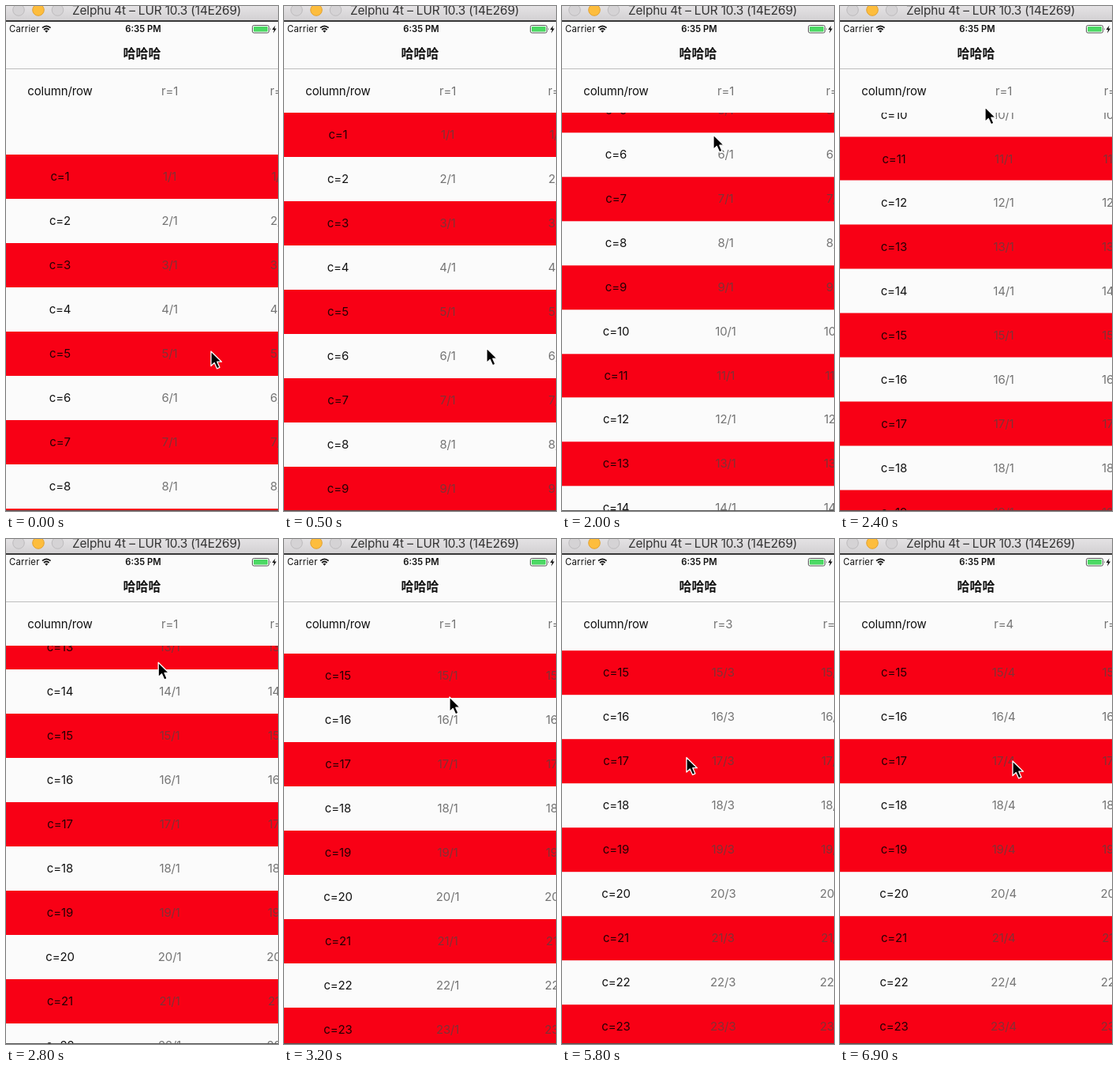
Write an HTML page that moves like this. It is 345x639 px and loops after 7 s.

```html
<!DOCTYPE html>
<html lang="zh">
<head>
<meta charset="utf-8">
<style>
  html, body { margin: 0; width: 100%; height: 100%; overflow: hidden; }
  body { position: relative; background: #fbfbfb; font: 15px Inter, sans-serif; letter-spacing: -.15px; color: #111; }
  div, svg { position: absolute; white-space: nowrap; }
  #stage { width: 345px; height: 639px; overflow: hidden; }
  #window { width: 345px; height: 18px; background: linear-gradient(#e4e2e4, #d3d1d3); border-bottom: 2px solid #383838; }
  #window div { left: 84px; top: -4px; line-height: 20px; font-size: 15.4px; color: #333; }
  .status { top: 22px; line-height: 15px; font-size: 11.3px; }
  #nav { top: 46px; width: 345px; height: 33px; line-height: 26px; text-align: center;
         font: 700 16px/26px "Noto Sans CJK SC", sans-serif; letter-spacing: 0; border-bottom: 1px solid #bdbdbd; }
  #table { top: 135px; width: 345px; height: 504px; overflow: hidden; }
  #head { top: 80px; width: 345px; height: 55px; overflow: hidden; }
  .row { width: 345px; height: 55.95px; line-height: 55.95px; text-align: center; }
  .red { background: #f80015; }
  .label { width: 137px; }
  .clip { left: 138px; width: 207px; height: 100%; overflow: hidden; color: #747474; }
  .red .label { color: #260004; }
  .red .clip { color: #823136; }
  .cell { width: 139.2px; }
  #edge { top: 638px; width: 345px; height: 1px; background: #555; }
</style>
</head>
<body>
<div id="stage">
  <div id="table"><div id="rows"></div></div>
  <div id="head"></div>
  <div id="window"><div>Zelphu 4t – LUR 10.3 (14E269)</div></div>
  <div class="status" style="left:4px;letter-spacing:.25px">Carrier</div>
  <div class="status" style="left:124px;width:100px;text-align:center;font-weight:600;letter-spacing:0">6:35 PM</div>
  <div id="nav">哈哈哈</div>
  <div id="edge"></div>
  <svg width="345" height="639">
    <g fill="#d5d3d5" stroke="#bdbbbd">
      <circle cx="16" cy="5" r="7.3"/>
      <circle cx="41" cy="5" r="7.3" fill="#fdbd3d" stroke="#e2a12f"/>
      <circle cx="65.500" cy="5" r="7.3"/>
    </g>
    <g fill="none" stroke="#111" stroke-width="1.7">
      <path d="M46 27.700Q51.300 22.900 56.600 27.700M48 30Q51.300 27 54.600 30"/>
      <path d="M51.300 33.800l-2-2.200q2-1.500 4 0z" fill="#111" stroke="none"/>
    </g>
    <rect x="312.500" y="24.500" width="21" height="9.500" rx="2" fill="#fff" stroke="#555"/>
    <rect x="314" y="26" width="18" height="6.500" rx="1" fill="#4cd964"/>
    <path d="M335 27.500q1.600 1.700 0 3.500z" fill="#555"/>
    <path d="M341.500 24.500l-4 5.500h2.500l-1 4.500 4-6h-2.500z" fill="#111"/>
    <path id="cursor" d="M0 0V18.500L4.300 14.500L7.600 21.800L11 20.300L7.900 13.200H13.500Z"
          fill="#000" stroke="#fff" stroke-width="1.300" stroke-linejoin="round"/>
  </svg>
</div>
<script>
const LOOP = 7000, STEP = 100, ROW = 55.95, COL = 139.2;
const $ = id => document.getElementById(id);

// Tracks are [time, value] pairs joined by monotone cubic curves.
const scrollY = [[0, 188], [200, 151], [400, 136], [500, 135], [700, 98], [1000, 33], [1500, -48],
  [2000, -119.7], [2400, -394.5], [2800, -562], [3200, -638], [3400, -641.8], [LOOP, -641.8]];
const scrollX = [[0, 0], [3900, 0], [4200, -40], [4500, -131], [4800, -190], [5200, -222], [5500, -225],
  [6000, -335], [6300, -398], [6600, -417.6], [LOOP, -417.6]];
const cursorX = [[0, 260], [500, 257], [1000, 235], [2000, 192], [2400, 184], [3200, 210], [3900, 242],
  [4200, 202], [4500, 111], [4700, 103], [5400, 232], [6000, 125], [6200, 118], [6900, 219]];
const cursorY = [[0, 437], [500, 433], [1000, 331], [2000, 163], [2400, 128], [3200, 200], [3900, 248],
  [4500, 261], [5400, 272], [6000, 278], [6900, 281]];

function sample(track, t) {
  const slope = i => track[i] && track[i + 1]
    ? (track[i + 1][1] - track[i][1]) / (track[i + 1][0] - track[i][0]) : 0;
  const tangent = i => {
    const a = slope(i - 1), b = slope(i);
    return a * b > 0 ? 2 * a * b / (a + b) : 0;
  };
  let i = 0;
  while (i < track.length - 2 && t >= track[i + 1][0]) i++;
  const [t0, v0] = track[i], [t1, v1] = track[i + 1];
  const d = t1 - t0, u = Math.min(1, (t - t0) / d), w = 1 - u;
  return v0 * (1 + 2 * u) * w * w + v1 * u * u * (3 - 2 * u)
    + d * u * w * (tangent(i) * w - tangent(i + 1) * u);
}

function rowHTML(label, cellText, top, red) {
  let cells = "";
  for (let r = 1; r <= 6; r++)
    cells += `<div class="cell" style="left:${(r - 1) * COL}px">${cellText(r)}</div>`;
  return `<div class="row${red ? " red" : ""}" style="top:${top}px"><div class="label">${label}</div>
    <div class="clip"><div class="cells">${cells}</div></div></div>`;
}

$("head").innerHTML = rowHTML("column/row", r => "r=" + r, 0, false);
let body = "";
for (let c = 1; c <= 25; c++)
  body += rowHTML("c=" + c, r => c + "/" + r, (c - 1) * ROW, c % 2);
$("rows").innerHTML = body;
const strips = document.querySelectorAll(".cells");

function draw(now) {
  const t = Math.floor(now % LOOP / STEP) * STEP;
  const x = sample(scrollX, t);
  $("rows").style.transform = `translateY(${sample(scrollY, t) - 135}px)`;
  for (const strip of strips) strip.style.transform = `translateX(${x}px)`;
  $("cursor").setAttribute("transform", `translate(${sample(cursorX, t)} ${sample(cursorY, t)})`);
}

let start;
function tick(now) {
  start ??= now;
  draw(now - start);
  requestAnimationFrame(tick);
}
draw(0);
requestAnimationFrame(tick);
</script>
</body>
</html>
```
